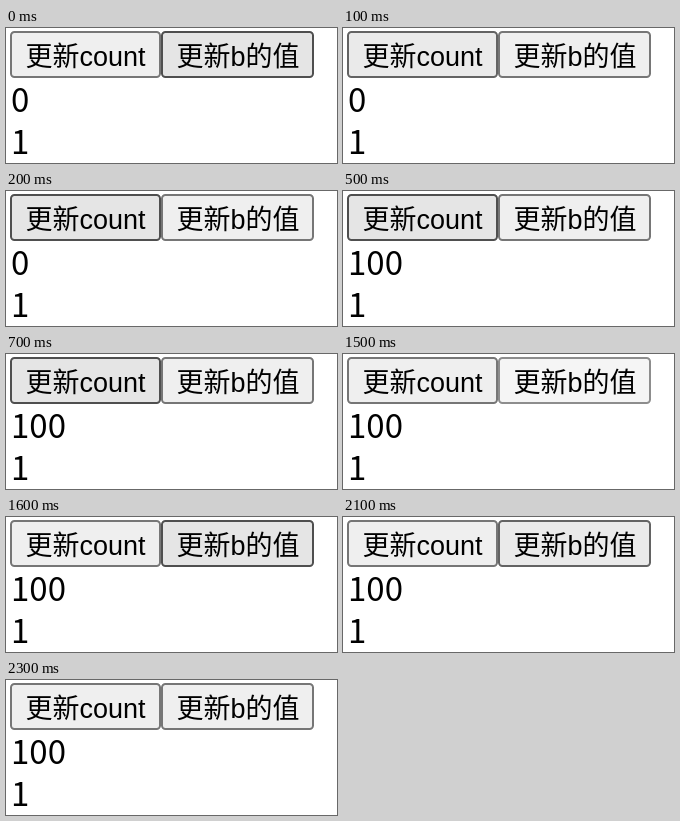
Animation of 331x135 px, one loop 3200 ms. Source, as an HTML page:

```html
<!DOCTYPE html>
<html lang="zh">
<head>
<meta charset="utf-8">
<style>
html, body { margin: 0; width: 100%; height: 100%; overflow: hidden; background: #fff; }
svg { display: block; }
rect { stroke-width: 2; }
.label { font: 300 27px "Liberation Sans", "Noto Sans CJK SC", "Noto Sans CJK", sans-serif; }
.value { font: 33px "Noto Sans CJK SC", "Noto Sans CJK", sans-serif; }
</style>
</head>
<body>
<svg width="331" height="135" viewBox="0 0 331 135">
  <rect id="left" x="5" y="4" width="149" height="45" rx="3.5"/>
  <rect id="right" x="156" y="4" width="151" height="45" rx="3.5"/>
  <text class="label" x="19.5" y="38">更新count</text>
  <text class="label" x="170.5" y="38">更新b的值</text>
  <text class="value" id="count" x="5" y="84">0</text>
  <text class="value" x="5" y="126">1</text>
</svg>
<script>
const LOOP = 3200;
const LOOKS = {
  idle: ['#efefef', '#767676'],
  mid: ['#eaeaea', '#636363'],
  hover: ['#e5e5e5', '#4f4f4f'],
  down: ['#f5f5f5', '#8d8d8d']
};
// start time, left button, right button, count
const STEPS = [
  [0, 'idle', 'hover', 0],
  [100, 'mid', 'idle', 0],
  [200, 'hover', 'idle', 0],
  [400, 'down', 'idle', 0],
  [500, 'hover', 'idle', 100],
  [1100, 'idle', 'hover', 100],
  [1500, 'idle', 'down', 100],
  [1600, 'idle', 'hover', 100],
  [2100, 'idle', 'mid', 100],
  [2200, 'idle', 'idle', 100]
];
const $ = id => document.getElementById(id);

function paint(id, look) {
  const [fill, stroke] = LOOKS[look];
  $(id).setAttribute('fill', fill);
  $(id).setAttribute('stroke', stroke);
}

function draw() {
  const t = performance.now() % LOOP;
  const [, left, right, count] = STEPS.findLast(step => step[0] <= t);
  paint('left', left);
  paint('right', right);
  $('count').textContent = count;
  requestAnimationFrame(draw);
}
draw();
</script>
</body>
</html>
```
